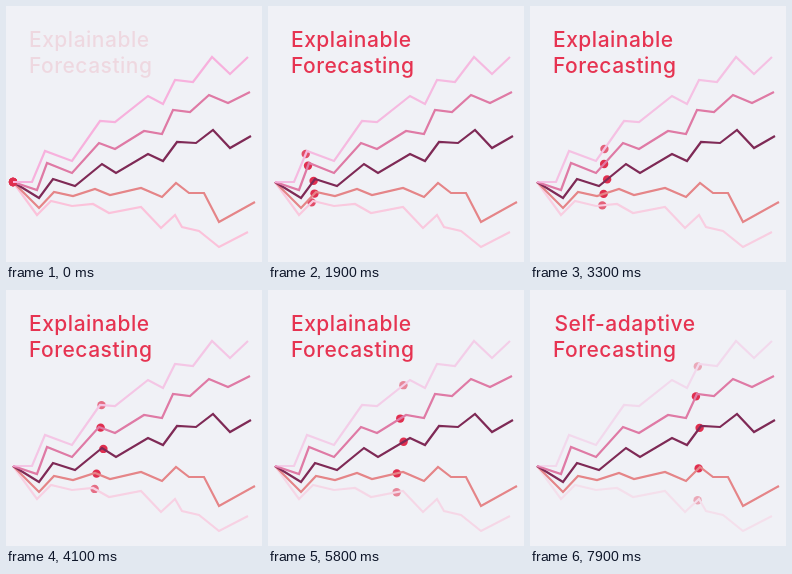
Animation, 256 px wide and 256 px high, one loop 8 s. Source, as an HTML page:

```html
<!DOCTYPE html>
<html lang="en">
<meta charset="utf-8">
<title>Forecasting</title>
<style>
  html, body { margin: 0; width: 100%; height: 100%; overflow: hidden; background: #f0f1f6; }
  svg { display: block; width: 100vw; height: 100vh; }
  text { font: 500 21px Inter, Lato, sans-serif; letter-spacing: .5px; fill: #e63351; }
  polyline { fill: none; stroke-width: 2.2; }
  circle { fill: #e02f4f; }
</style>
<svg viewBox="0 0 256 256">
  <g id="chart"></g>
  <text id="first" x="23" y="41">Explainable</text>
  <text id="second" x="24.5" y="41">Self-adaptive</text>
  <text id="word" x="23" y="67">Forecasting</text>
</svg>
<script>
  const LOOP = 8000;
  const start = [7, 176];
  // Each series: stroke, whether it fades over time, and its points after the start.
  const series = [
    ['#fbc2da', true, '31,209 45,195 66,200 87,198 103,207 135,201 155,222 169,209 176,221 193,225 213,241 242,226'],
    ['#e58588', false, '33,202 48,186 67,190 89,183 104,189 135,182 156,191 170,177 183,187 198,187 213,216 249,196'],
    ['#7f2a56', false, '33,192 47,173 69,180 96,158 110,167 142,148 157,155 171,136 190,137 207,124 224,142 245,130'],
    ['#df7aa5', false, '31,184 41,157 66,167 93,137 109,143 138,125 156,128 167,104 184,106 203,89 222,97 244,86'],
    ['#f7b1dd', true, '26,176 39,145 66,155 94,115 109,116 142,90 157,98 169,74 187,76 206,51 224,68 242,51'],
  ];
  const $ = id => document.getElementById(id);

  function add(parent, tag, attrs = {}) {
    const el = document.createElementNS('http://www.w3.org/2000/svg', tag);
    for (const key in attrs) el.setAttribute(key, attrs[key]);
    return parent.appendChild(el);
  }

  const tracks = series.map(([stroke, fades, path]) => {
    const points = [start, ...path.split(' ').map(p => p.split(',').map(Number))];
    const group = add($('chart'), 'g');
    const dot = add(group, 'circle', { r: 4.2 });
    add(group, 'polyline', { points: points.join(' '), stroke });
    return { points, fades, group, dot };
  });

  const ramp = (t, from, to) => Math.min(1, Math.max(0, (t - from) / (to - from)));

  function draw(now) {
    const t = now % LOOP;
    // Every dot crosses one segment per second.
    const step = Math.floor(t / 1000), part = t / 1000 - step;
    for (const { points, fades, group, dot } of tracks) {
      const [a, b] = points.slice(step, step + 2);
      dot.setAttribute('cx', a[0] + (b[0] - a[0]) * part);
      dot.setAttribute('cy', a[1] + (b[1] - a[1]) * part);
      if (fades) group.setAttribute('opacity', 1 - .64 * t / LOOP);
    }
    const intro = ramp(t, -130, 900);
    $('word').setAttribute('opacity', intro);
    $('first').setAttribute('opacity', intro * (1 - ramp(t, 5800, 6300)));
    $('second').setAttribute('opacity', ramp(t, 6300, 7250));
    requestAnimationFrame(draw);
  }
  draw(0);
</script>
</html>
```
